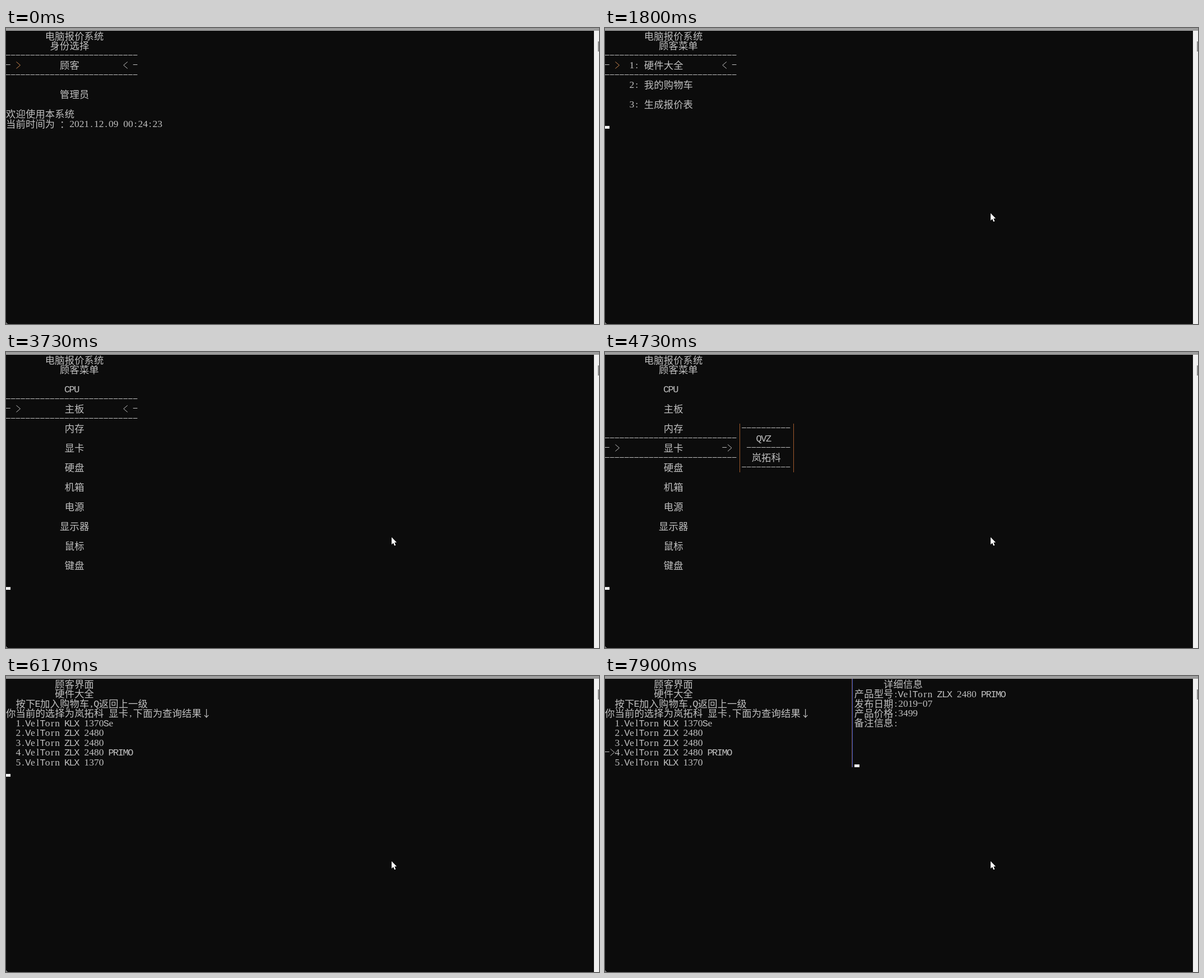
Animation, 1058 px wide and 529 px high, one loop 8 s. Source, as an HTML page with a canvas:

```html
<!DOCTYPE html>
<html lang="zh-CN">
<head>
<meta charset="utf-8">
<style>
html, body { margin: 0; width: 100%; height: 100%; overflow: hidden; background: #0c0c0c; }
canvas { display: block; }
</style>
</head>
<body>
<canvas id="stage" width="1058" height="529"></canvas>
<script>
const g = document.getElementById('stage').getContext('2d');
const LOOP = 8000, CELL = 8.72, ROW = 17.48, TOP = 5.3;
const INK = '#c0c0c0', ORANGE = '#a05a2c', BROWN = '#6e4630', BLUE = '#3a55c8';
const HAN = '300 17.3px "Noto Sans CJK SC", "Noto Sans CJK", sans-serif';
const SERIF = '17.5px "Liberation Serif", serif';
const CAPS = '17px "Liberation Mono", monospace';

const parts = ['CPU', '主板', '内存', '显卡', '硬盘', '机箱', '电源', '显示器', '鼠标', '键盘'];
const chipMakers = ['QVZ', '枫澜芯'], cardMakers = ['QVZ', '岚拓科'];
const cards = [
  ['VelTorn KLX 1370Se', '2016-10', 1299],
  ['VelTorn ZLX 2480', '2019-01', 2699],
  ['VelTorn ZLX 2480', '2019-01', 2599],
  ['VelTorn ZLX 2480 PRIMO', '2019-07', 3499],
  ['VelTorn KLX 1370', '2016-10', 999],
];

const topY = row => TOP + row * ROW;
const midY = row => topY(row + 0.5);

function box(color, x, y, w, h) {
  g.fillStyle = color;
  g.fillRect(x, y, w, h);
}

function chevron(ch, x, y, color) {
  const back = ch === '>' ? x + 1 : x + 7.5, tip = ch === '>' ? x + 8 : x + 0.5;
  g.strokeStyle = color;
  g.lineWidth = 1;
  g.beginPath();
  g.moveTo(back, y - 6);
  g.lineTo(tip, y);
  g.lineTo(back, y + 6);
  g.stroke();
}

// Console text on a grid; Chinese characters take two cells.
function put(col, row, text, color = INK) {
  const y = midY(row);
  for (const ch of text) {
    const wide = ch.charCodeAt(0) > 0x2000, x = col * CELL;
    if (ch === '-') box(color, x, Math.round(y - 1), 7.7, 1);
    else if (ch === '<' || ch === '>') chevron(ch, x, y, color);
    else {
      g.fillStyle = color;
      g.font = wide ? HAN : /[A-Z]/.test(ch) ? CAPS : SERIF;
      g.textAlign = 'center';
      g.fillText(ch, x + CELL * (wide ? 1 : 0.5), y + (wide ? 6.5 : 6));
    }
    col += wide ? 2 : 1;
  }
}

function bar(col, row, rows, color, fringe) {
  const x = Math.round((col + 0.5) * CELL), y = Math.round(topY(row));
  const height = Math.round(topY(row + rows)) - y;
  box(color, x, y, 1, height);
  if (fringe) box(fringe, x + 1, y, 1, height);
}

function caret(col, row) {
  box('#f2f2f2', Math.round(col * CELL), Math.round(topY(row + 1)) - 5, col ? 9 : 8, 5);
}

function highlight(row, leftColor = INK) {
  put(0, row - 1, '-'.repeat(27));
  put(0, row + 1, '-'.repeat(27));
  if (leftColor) {
    put(0, row, '-');
    put(2, row, '>', leftColor);
  }
}

function roles(clock) {
  put(8, 0, '电脑报价系统');
  put(9, 1, '身份选择');
  highlight(3, '#d08a50');
  put(11, 3, '顾客');
  put(24, 3, '< -');
  put(11, 6, '管理员');
  put(0, 8, '欢迎使用本系统');
  put(0, 9, '当前时间为 ：2021.12.09 00:24:' + clock);
}

function customerTitle() {
  put(8, 0, '电脑报价系统');
  put(11, 1, '顾客菜单');
}

function customerMenu() {
  customerTitle();
  highlight(3, '#d08a50');
  put(24, 3, '< -');
  ['1: 硬件大全', '2: 我的购物车', '3: 生成报价表'].forEach((s, i) => put(5, 3 + 2 * i, s));
  caret(0, 9);
}

function submenu(top, right, makers, chosen) {
  bar(27, top, 5, ORANGE);
  bar(right, top, 5, ORANGE);
  put(28, top, '-'.repeat(right - 28));
  put(29, top + 2, '-'.repeat(right - 29));
  put(28, top + 4, '-'.repeat(right - 28));
  makers.forEach((name, i) => {
    const latin = /[A-Z]/.test(name), col = latin ? 31 : 30, row = top + 1 + 2 * i;
    put(col, row, name);
    if (i === chosen) {
      put(col - 1, row, '>');
      put(latin ? 34 : 36, row, '<');
    }
  });
}

function hardware(selected, maker = -1) {
  const row = 3 + 2 * selected, opens = selected === 0 || selected === 3;
  customerTitle();
  parts.forEach((name, i) => put(name === '显示器' ? 11 : 12, 3 + 2 * i, name));
  highlight(row, maker < 0 ? INK : null);
  put(24, row, opens ? '->' : '< -');
  if (selected === 0) submenu(2, 37, chipMakers, maker);
  if (selected === 3) submenu(7, 38, cardMakers, maker);
}

function results(selected = -1) {
  put(10, 0, '顾客界面');
  put(10, 1, '硬件大全');
  put(2, 2, '按下E加入购物车,Q返回上一级');
  put(0, 3, '你当前的选择为' + cardMakers[1] + ' 显卡,下面为查询结果↓');
  cards.forEach(([name], i) => put(2, 4 + i, i + 1 + '.' + name));
  if (selected < 0) return caret(0, 9);
  const [name, date, price] = cards[selected];
  put(0, 4 + selected, '->');
  bar(50, 0, 9, BROWN, BLUE);
  put(57, 0, '详细信息');
  put(51, 1, '产品型号:' + name);
  put(51, 2, '发布日期:' + date);
  put(51, 3, '产品价格:' + price);
  put(51, 4, '备注信息:');
}

function pointer(x, y) {
  g.save();
  g.translate(x, y);
  g.beginPath();
  [[0, 0], [0, 13], [3, 10.2], [5.2, 15.2], [7.3, 14.2], [5.2, 9.4], [9, 9.2]]
    .forEach(p => g.lineTo(...p));
  g.closePath();
  g.fillStyle = '#fff';
  g.fill();
  g.restore();
}

function frame() {
  box('#0c0c0c', 0, 0, 1058, 529);
  box('#f0f0f0', 1049, 5, 9, 524);
  box('#8a8a8a', 1056, 24, 2, 18);
  box('#9d9d9d', 0, 0, 1058, 5);
  box('#8c8c8c', 0, 526, 1, 3);
  box('#8c8c8c', 1, 528, 2, 1);
}

// Each scene holds from its start time until the next one.
const scenes = [
  [0, () => roles(23)],
  [300, () => { roles(24); caret(0, 10); }],
  [1400, () => { roles(25); caret(0, 10); }],
  [1800, customerMenu],
  [2620, () => { hardware(0); caret(0, 23); }],
  [3730, () => { hardware(1); caret(0, 23); }],
  [4330, () => { hardware(2); caret(0, 23); }],
  [4730, () => { hardware(3); caret(0, 23); }],
  [5030, () => caret(0, 23)],
  [5130, () => { hardware(3, 0); caret(0, 23); }],
  [5740, () => hardware(3, 1)],
  [5830, () => { hardware(3, 1); caret(0, 23); }],
  [6170, () => results()],
  [6270, () => { results(0); caret(51, 8); }],
  [6690, () => { results(1); caret(51, 8); }],
  [6890, () => caret(51, 8)],
  [6980, () => { results(2); caret(51, 8); }],
  [7190, () => { results(3); caret(51, 8); }],
  [7800, () => { results(3); put(51, 8, '加入购物车成功!'); }],
  [7900, () => { results(3); caret(51, 8); }],
];

function draw(now) {
  const t = now % LOOP;
  frame();
  scenes.findLast(([start]) => start <= t)[1]();
  if (t >= 300) {
    const left = 1 - Math.min(1, Math.floor((t - 300) / 100 + 1) / 5);
    pointer(688 + 370 * left * left, 331 + 198 * left * left);
  }
  requestAnimationFrame(draw);
}
requestAnimationFrame(draw);
</script>
</body>
</html>
```
